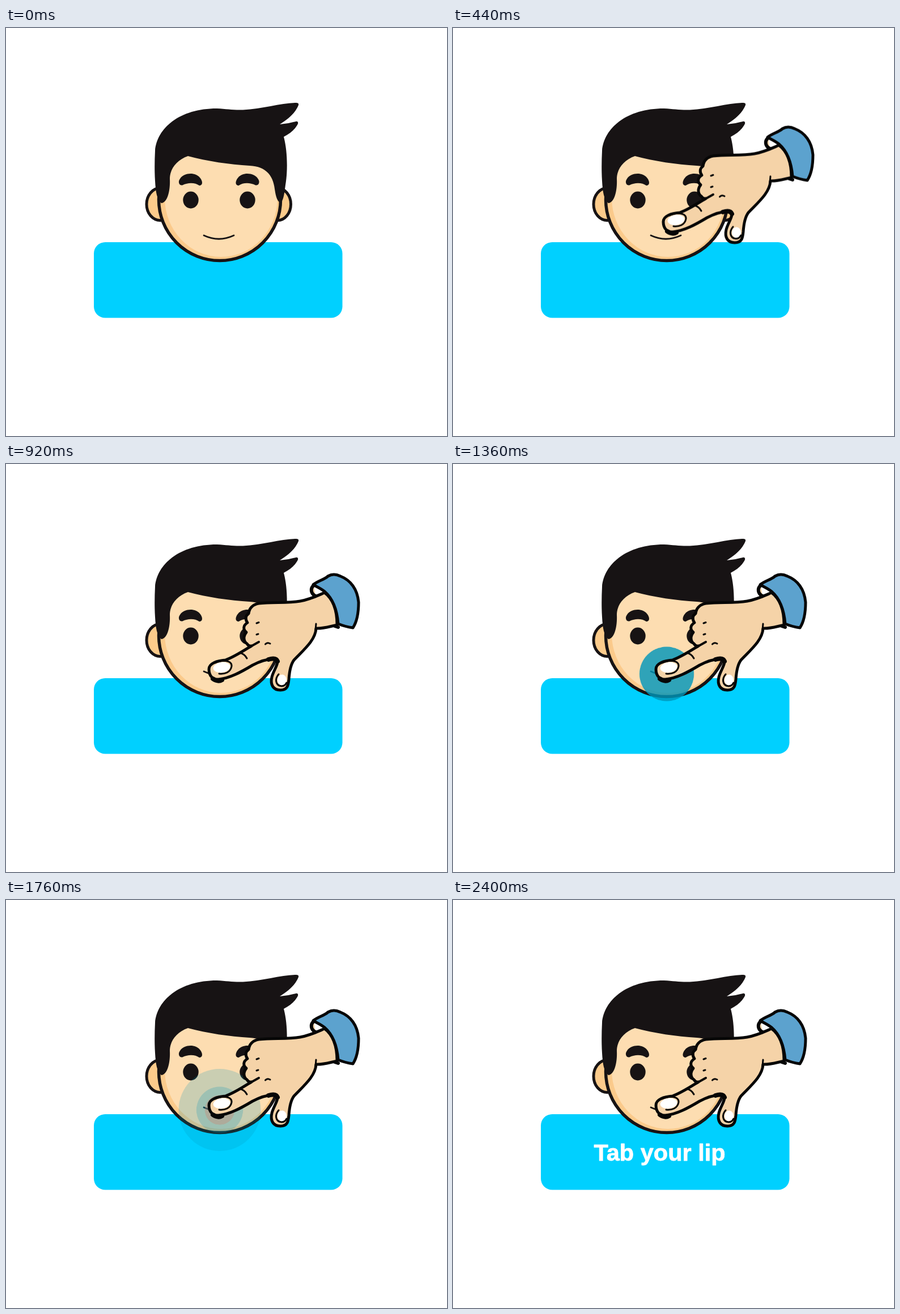
Write an HTML page that moves like this. It is 778 px wide and 720 px high and loops after 4.8 s.

```html
<!DOCTYPE html>
<html lang="en">
<head>
<meta charset="utf-8">
<title>Tab your lip</title>
<style>
  html, body { margin: 0; width: 100%; height: 100%; overflow: hidden; background: #fff; }
  svg { display: block; width: 100vw; height: 100vh; }

  .hand { animation: reach 4800ms infinite, appear 4800ms linear infinite; }
  @keyframes reach {
    0%, 2.5% { transform: translate(20.5px, -32px); animation-timing-function: cubic-bezier(.3333, 0, .6667, 1); }
    18.75%, 100% { transform: none; }
  }
  @keyframes appear {
    0%, .4% { opacity: 0; }
    4.6%, 100% { opacity: 1; }
  }

  .ring { transform-origin: 377px 370.5px; animation: 4800ms linear infinite; }
  .wide { fill: #0096b9; animation-name: wide; }
  .mid { fill: #0096b9; animation-name: mid; }
  .core { fill: #d27864; animation-name: core; }
  @keyframes wide {
    0%, 21.667% { transform: scale(0); opacity: .82; }
    28.333% { transform: scale(.66); opacity: .82; animation-timing-function: cubic-bezier(.33, .66, .66, 1); }
    35% { transform: scale(1); opacity: .3; }
    36.667% { transform: scale(1); opacity: .2; }
    40%, 100% { transform: scale(1); opacity: 0; }
  }
  @keyframes mid {
    0%, 30.833% { transform: scale(0); opacity: .3; }
    36.667% { transform: scale(.565); opacity: .22; }
    41.667%, 100% { transform: scale(.8); opacity: 0; }
  }
  @keyframes core {
    0%, 33.333% { transform: scale(0); opacity: .35; }
    36.667% { transform: scale(.36); opacity: .3; }
    41.667%, 100% { transform: scale(.6); opacity: 0; }
  }

  .ink { fill: #171314; }
  .ear { fill: #fccb8b; stroke: #171314; stroke-width: 5; }
  .hand { fill: none; stroke: #060606; stroke-width: 3; stroke-linecap: round; stroke-linejoin: round; }
  .label {
    font: bold 41.5px "Liberation Sans", Arial, sans-serif;
    fill: #fff; stroke: #fff; stroke-width: .8; stroke-linejoin: round;
  }
</style>
</head>
<body>
<svg viewBox="0 0 778 720">
  <defs>
    <path id="brow" d="M311 277.500C305 278 303 271 307 266C314 255 334 254 342 264C348 271 347 278 341 278C334 273 322 272 311 277.500Z"/>
  </defs>

  <rect x="155" y="378" width="438.5" height="133.5" rx="20" fill="#00d0ff"/>

  <g>
    <ellipse class="ear" cx="272" cy="311" rx="24" ry="28.5"/>
    <ellipse class="ear" cx="479" cy="311" rx="23.5" ry="28.5"/>
    <circle cx="377" cy="303" r="107.5" fill="#fbca8b" stroke="#171314" stroke-width="5.5"/>
    <ellipse cx="379.5" cy="300" rx="99.5" ry="104" fill="#fdddb1"/>
    <path class="ink" d="M274 309C266 303 264 288 263 270C262 255 262 235 263 217C266 177 306 142 372 142
      C390 143 400 145 418 144.500C452 143 486 132 512 132Q517 132 516 136C511 149 499 160 483 170
      Q498 169 511 165Q516 164 515 169C510 179 502 186 490 192C497 218 497 254 493 277
      C491 291 490 303 485 308C479 308 476 298 474 284C471 259 457 244 430 243C394 241 355 235 321 226
      C301 233 289 249 289 266C290 287 285 308 274 309Z"/>
    <use class="ink" href="#brow"/>
    <use class="ink" href="#brow" transform="translate(751.5) scale(-1 1)"/>
    <ellipse class="ink" cx="326" cy="303.5" rx="13.7" ry="15"/>
    <ellipse class="ink" cx="426" cy="303.5" rx="13.7" ry="15"/>
    <path d="M349 366Q375.500 378.500 402 366" fill="none" stroke="#171314" stroke-width="2.8" stroke-linecap="round"/>
  </g>

  <circle class="ring wide" cx="377" cy="370.5" r="72.5"/>
  <circle class="ring mid" cx="377" cy="370.5" r="72.5"/>
  <circle class="ring core" cx="377" cy="370.5" r="72.5"/>

  <g class="hand">
    <path fill="#f5d3a8" stroke-width="5" d="M562 227C548 233 536 239 519 242C495 246 470 243 446 246
      C434 248 429 256 428 264C422 268 422 275 426 280C418 285 418 292 424 297C418 304 419 313 425 317
      Q428 322 433 321C420 329 402 341 387 346C372 347 358 352 358 362C358 374 365 381 375 380
      C395 378 415 367 435 355C450 347 465 342 478 345C482 352 472 364 469 376
      C466 389 471 399 484 399C497 399 498 390 499 380C500 365 502 354 508 346
      C525 328 546 311 547 290C558 291 570 287 584 284C584 258 577 238 562 227Z"/>
    <path stroke-width="8" d="M365 379Q374 385 381 381M463 345Q476 341 479 348"/>
    <path stroke-width="4" d="M430 323L446 314"/>
    <path d="M412 333Q421 335 425 343M442 281L446 279.500M442 301L445 300M457.500 318Q461 314 466 317M547 282L546 293"/>
    <ellipse cx="380.5" cy="359" rx="15" ry="9" fill="#fff" stroke="none" transform="rotate(-8 380.5 359)"/>
    <path d="M369 351C380 345 399 346 398 357C396 368 386 371 376 370"/>
    <ellipse cx="487" cy="381" rx="8" ry="9.500" fill="#fff" stroke="none"/>
    <path d="M481 371C474 379 475 391 486 392Q492 392 495 386"/>
    <path fill="#f5d3a8" stroke-width="6" d="M543 214C536 220 538 229 546 233"/>
    <path fill="#5ca2ce" stroke-width="5" d="M542 213C550 206 560 205 568 198Q578 192 590 198
      C608 205 620 221 622 244C622 262 620 277 612 289Q598 287 586 282C584 258 577 238 562 225C556 220 549 217 542 213Z"/>
    <path stroke-width="6" d="M580 286L586 288"/>
  </g>

  <text class="label" id="label" x="248.5" y="460"></text>
</svg>
<script>
  const label = document.getElementById("label");
  const words = "Tab your lip";
  const loop = 4800, begin = 2040, pace = 40;
  let start;

  // Spaces take no typing time.
  function typed(count) {
    let end = 0;
    while (count > 0 && end < words.length) {
      if (words[end++] !== " ") count--;
    }
    return words.slice(0, end);
  }

  function draw(now) {
    start ??= now;
    const t = (now - start) % loop;
    const text = typed(Math.floor((t - begin) / pace) + 1);
    if (label.textContent !== text) label.textContent = text;
    requestAnimationFrame(draw);
  }
  requestAnimationFrame(draw);
</script>
</body>
</html>
```
